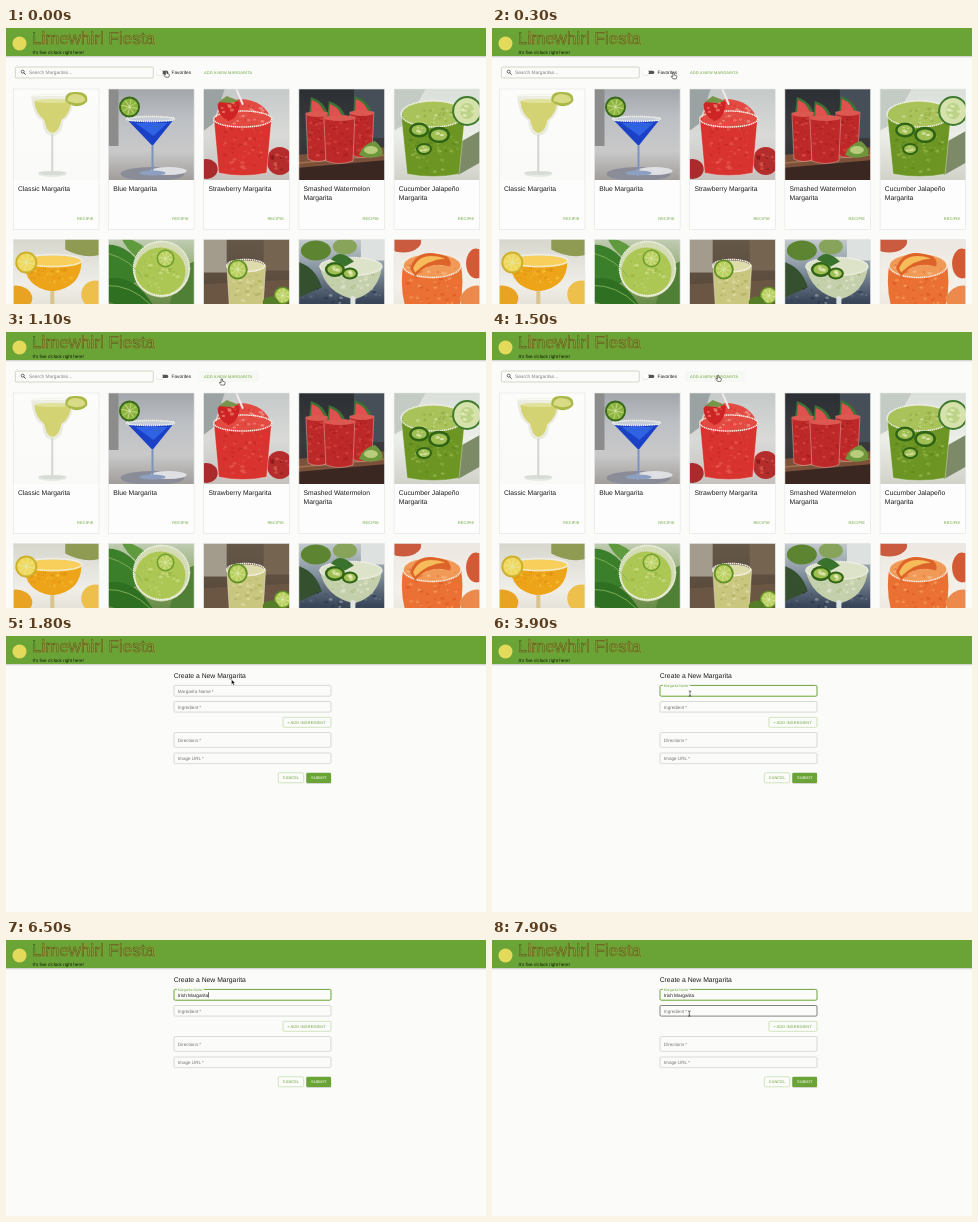
An HTML page that plays this animation: 480x276 px, repeating every 8 s.

```html
<!DOCTYPE html>
<html lang="en">
<head>
<meta charset="utf-8">
<title>Cocktail recipes</title>
<style>
html, body { margin: 0; width: 100%; height: 100%; overflow: hidden; background: #fbfbfa; }
svg { display: block; width: 100vw; height: 100vh; }
text { font-family: "Liberation Sans", Arial, sans-serif; text-rendering: geometricPrecision; white-space: pre; }
</style>
</head>
<body>
<svg id="stage" viewBox="0 0 480 276" xmlns="http://www.w3.org/2000/svg"></svg>
<script>
const GREEN = '#6ba436', PAGE = '#fbfbfa', INK = '#1d1d1d', GREY = '#777', LINE = '#c2c4c1';
const LOOP = 8000, STEP = 100;

// Markup helpers
const rect = (x, y, w, h, fill, more = '') =>
  `<rect x="${x}" y="${y}" width="${w}" height="${h}" fill="${fill}" ${more}/>`;
const oval = (x, y, rx, ry, fill, more = '') =>
  `<ellipse cx="${x}" cy="${y}" rx="${rx}" ry="${ry}" fill="${fill}" ${more}/>`;
const path = (d, fill, more = '') => `<path d="${d}" fill="${fill}" ${more}/>`;
const line = (d, color, width = 1, more = '') =>
  path(d, 'none', `stroke="${color}" stroke-width="${width}" stroke-linecap="round" ${more}`);
const text = (x, y, size, fill, words, more = '') =>
  `<text x="${x}" y="${y}" font-size="${size}" fill="${fill}" ${more}>${words}</text>`;
const caps = (x, y, words, fill = GREEN) => text(x, y, 3.94, fill, words, 'letter-spacing=".11"');
const box = (x, y, w, h, color, more = '') =>
  rect(x, y, w, h, 'none', `rx="1.3" stroke="${color}" stroke-width=".6" ${more}`);

let fades = 0;
const fade = (...colors) => {
  const id = 'fade' + fades++;
  const stops = colors.map((c, i) => `<stop offset="${i / (colors.length - 1)}" stop-color="${c}"/>`);
  return `<linearGradient id="${id}" x2="0" y2="1">${stops.join('')}</linearGradient>` +
    rect(-3, -3, 92, 97, `url(#${id})`);
};

// Seeded specks that give ice and fruit pulp their texture
let seed = 7;
const random = () => (seed = seed * 16807 % 2147483647) / 2147483647;
const grain = (count, x, y, rx, ry, ...colors) => {
  let out = '';
  for (let i = 0; i < count; i++) {
    const a = random() * 2 * Math.PI, r = Math.sqrt(random()), size = .6 + random() * 1.6;
    out += oval((x + Math.cos(a) * r * rx).toFixed(1), (y + Math.sin(a) * r * ry).toFixed(1),
      size.toFixed(1), (size * .7).toFixed(1), colors[i % colors.length], 'opacity=".55"');
  }
  return out;
};

const wheel = (x, y, r, rind = '#5f8f25', flesh = '#b9d05f') => {
  let spokes = '';
  for (let i = 0; i < 4; i++) {
    const a = i * Math.PI / 4 + .2, dx = Math.cos(a) * r * .75, dy = Math.sin(a) * r * .75;
    spokes += `M${x - dx} ${y - dy}L${x + dx} ${y + dy}`;
  }
  return oval(x, y, r, r, rind) + oval(x, y, r * .82, r * .82, flesh) + line(spokes, '#e4ecbc', .6);
};
const chili = (x, y, r) => oval(x, y, r, r * .75, '#2f6415') + oval(x, y, r * .75, r * .5, '#9fbf52') +
  grain(6, x, y, r * .45, r * .3, '#eef1c8');
const salt = (x, y, rx, ry) => oval(x, y, rx, ry, 'none',
  'stroke="#f4f2e8" stroke-width="1.5" stroke-dasharray="1.4 .5"');
const tumbler = (x, y, w, h, color, inset = 3) =>
  path(`M${x} ${y}h${w}l${-inset} ${h}q${inset - w / 2} 5 ${2 * inset - w} 0z`, color,
    'stroke="#fff" stroke-opacity=".4" stroke-width=".8"');

const photos = [
  () => fade('#fcfcfa', '#f9faf7') + oval(39, 85, 14, 3, '#e6e9e3') +
    path('M18 7H61Q60 25 50 32Q49 46 39 47Q30 46 29 32Q19 26 18 7', '#eaebdf') +
    path('M21 12H58Q57 25 48 31Q46 43 39 44Q33 43 31 31Q22 24 21 12', '#d3d374') +
    oval(40, 12, 18, 2, '#e2e19a') + line('M39 46V83', '#d2d6cf', 2) +
    oval(39, 84, 14, 2, '#d8dcd6') + salt(40, 7, 21, 1.6) +
    path('M52 12Q51 3 61 3Q75 2 74 12Q70 18 61 17Q56 16 52 12', '#a9b847') +
    path('M54 12Q54 6 61 5Q71 5 72 11Q68 15 61 14z', '#d9db86'),
  () => fade('#a0a4a8', '#bcbfc3', '#c9c9ca', '#9d9995') + rect(-3, -3, 13, 60, '#8d8c8c') +
    oval(44, 85, 32, 7, '#8a8d98') + oval(60, 82, 18, 4, '#dfe0e4') +
    path('M17 28H66L44 58z', '#c9d3e2', 'opacity=".7"') + path('M20 32H64L44 57z', '#1a41c6') +
    path('M27 34H59L45 47z', '#2f63e4') + line('M44 57V82', '#7d93bb', 2) + oval(44, 84, 13, 2.5, '#8da0c2') +
    salt(42, 30, 24, 2.5) + wheel(21, 18, 10.5, '#36691a', '#8db43c'),
  () => fade('#c3c8c8', '#d9dad8', '#c4c0bc') + path('M-3 -3H22L9 35L-3 44z', '#9aa3a2') +
    oval(3, 80, 11, 10, '#a92b2b') + oval(76, 72, 13, 14, '#b42d2c') + grain(14, 76, 72, 9, 10, '#e3645a', '#7e1818') +
    tumbler(10, 28, 58, 56, '#d8332f', 5) + grain(70, 38, 56, 23, 26, '#ee635a', '#c02523', '#e24a42') +
    path('M12 32Q14 15 36 10Q62 11 68 32Q40 44 12 32', '#e34a42') +
    grain(34, 42, 26, 22, 11, '#f48d81', '#f3aea3', '#d53631') + salt(39, 30, 29, 8) +
    line('M39 15L33 1', '#f0e9e7', 2) + path('M14 15Q22 4 36 13Q36 28 25 32Q13 26 14 15', '#cf2426') +
    grain(10, 25, 19, 7, 8, '#f3a384') + path('M15 13L23 7L35 12L27 14z', '#78964b'),
  () => fade('#2a2e33', '#3b3b3d', '#33292a') + rect(55, -3, 34, 52, '#464e58') +
    path('M-3 66L89 58V94H-3z', '#7b5239') + path('M-3 79L89 71V94H-3z', '#3a2722') +
    line('M0 74L86 66', '#a2704c', 1.5) +
    [[7, 24, 24, 46], [51, 23, 24, 43], [25, 28, 31, 44]].map(([x, y, w, h]) =>
      path(`M${x + 3} ${y + 3}L${x + 5} ${y - 16}Q${x + 20} ${y - 11} ${x + 22} ${y + 3}z`, '#3f7236') +
      path(`M${x + 5} ${y + 3}L${x + 6} ${y - 13}Q${x + 17} ${y - 9} ${x + 19} ${y + 3}z`, '#e0504e') +
      tumbler(x, y, w, h, '#bd2928', 2) + grain(35, x + w / 2, y + h / 2, w * .4, h * .45, '#dd4c46', '#a31e20') +
      oval(x + w / 2, y + 1, w / 2, 3, '#dc5850')).join('') +
    path('M60 66Q65 54 76 52Q87 61 82 67Q70 71 60 66', '#6f963c') + oval(72, 61, 7, 4, '#b8cd7c'),
  () => fade('#d9ded9', '#eceee8', '#cfd1c8') + path('M-3 -3H33L12 35L-3 43z', '#c3cbc4') +
    path('M68 52L89 40V72L64 86z', '#7d8a68') + tumbler(7, 25, 64, 60, '#6c9524', 6) +
    grain(70, 39, 58, 25, 25, '#86ad38', '#557d19', '#a3c052') + oval(39, 25, 31, 13, '#a9c35a') +
    grain(30, 39, 28, 24, 9, '#d3dfa0', '#7fa337') + salt(39, 25, 32, 13) +
    chili(25, 41, 10) + chili(45, 46, 11) + chili(30, 60, 8) +
    oval(73, 22, 15, 15, '#3f7a2f') + oval(73, 22, 13, 13, '#d5e2ac') + oval(73, 22, 7, 8, '#bcd388') +
    grain(9, 73, 22, 6, 6, '#eef2cd'),
  () => fade('#d6d5cc', '#efeee8', '#d8d1c2') + path('M52 -3H89V15Q70 20 52 10z', '#8f9a52') +
    oval(2, 59, 17, 13, '#e7a321') + oval(82, 55, 14, 14, '#ecc04a') +
    path('M11 22H68Q68 48 39 52Q11 48 11 22', '#eda419') + grain(40, 39, 35, 22, 10, '#f6bf38', '#dc8d0f') +
    oval(39.5, 22, 29, 6, '#f7cf5a') + salt(39.5, 21, 29, 6) + line('M39 53V94', '#d9c48d', 4) +
    wheel(13, 23, 11, '#cdb02b', '#f0d85c'),
  () => fade('#c4cfb7', '#7f9d5d', '#466f2b') + path('M-3 5Q25 4 39 40Q16 43 -3 64z', '#3b7f2a') +
    path('M12 -3Q40 3 47 24Q24 22 12 -3', '#5f9a3f') + path('M70 30L89 20V70H60z', '#4f8035') +
    oval(53, 30, 28, 28, '#d3dcb4') + oval(52, 32, 25, 24, '#adc755') +
    grain(45, 52, 32, 21, 20, '#d5e198', '#8dae39', '#c4d676') + salt(53, 29, 28, 27) +
    wheel(57, 19, 9, '#6f9d2d') + path('M-3 40Q25 32 46 68Q20 71 -3 61', '#2f6f22') +
    line('M-2 46Q22 45 42 65M0 14Q22 20 34 38', '#84b357', .9),
  () => fade('#66594a', '#5a4b3d', '#453a30') + rect(-3, -3, 26, 36, '#a39b8b') + rect(60, -3, 29, 34, '#75644f') +
    path('M-3 45L89 40V94H-3z', '#6b5644') + tumbler(23, 26, 39, 48, '#c9c67f', 3) +
    grain(35, 42, 47, 16, 16, '#e4e1ad', '#aaa95b') + oval(42, 27, 19, 6, '#dedcaa') +
    salt(42, 26, 19, 6) + wheel(34, 30, 10) + wheel(79, 56, 9) + oval(67, 63, 8, 6, '#557c27'),
  () => fade('#c7cfd0', '#8795a1', '#39465a', '#334054') + oval(17, 11, 15, 10, '#5d8431') +
    oval(46, 7, 12, 8, '#88a45a') + rect(62, -3, 27, 24, '#dde1df') + path('M-3 22Q16 26 23 48L-3 59z', '#34502f') +
    grain(35, 43, 57, 42, 11, '#65758a', '#232d40', '#a8b3ba') +
    path('M21 27H83Q80 53 55 60Q26 53 21 27', '#c4cfac') +
    grain(45, 52, 38, 24, 13, '#eef1e0', '#a5b67b', '#dce3c5') + oval(52, 27, 31, 9, '#dce3c9') +
    salt(52, 27, 31, 9) + line('M54 59V94', '#dfe5e3', 5) + chili(36, 30, 10) + chili(51, 34, 8) +
    path('M32 20Q41 8 55 22L46 27z', '#39722c'),
  () => fade('#ece7e0', '#f3f0ea', '#e5dbd0') + oval(9, 2, 18, 11, '#cb5b3e') + oval(82, 24, 10, 15, '#d45a35') +
    path('M9 26Q4 58 19 88H58Q72 58 67 26z', '#ea7034') +
    grain(60, 38, 50, 25, 24, '#f79a55', '#d9521f', '#f4b06c') + oval(38, 26, 29, 12, '#f19a58') +
    grain(25, 38, 28, 24, 8, '#f9c795', '#e2682f') + salt(38, 26, 29, 12) +
    path('M16 29Q23 6 53 17Q58 22 56 27Q33 21 21 37z', '#dd6328') +
    path('M19 29Q26 11 51 19Q34 20 21 33z', '#f6bc59') + path('M65 58Q77 41 89 48V70H69z', '#eb8a4c')
];

const titles = [['Classic Margarita'], ['Blue Margarita'], ['Strawberry Margarita'],
  ['Smashed Watermelon', 'Margarita'], ['Cucumber Jalapeño', 'Margarita']];

const card = (draw, i) => {
  const x = 7.3 + i % 5 * 95.2, y = i < 5 ? 61 : 211.5;
  const words = (titles[i] || []).map((t, n) => text(4.7, 102.4 + n * 9, 6.75, INK, t)).join('');
  return `<g transform="translate(${x} ${y})">` + rect(0, 0, 85.6, 140.5, '#fdfdfd') +
    `<g clip-path="url(#photo)"><g filter="url(#soft)">${draw()}</g></g>${words}` + caps(63.7, 131, 'RECIPIE') +
    rect(0, 0, 85.6, 140.5, 'none', 'stroke="#e3e5e1" stroke-width=".6"') + '</g>';
};

const title = (dx, color, width) => text(26 + dx, 16.3, 17, 'none', 'Limewhirl Fiesta',
  `stroke="${color}" stroke-width="${width}"`);
const header = rect(0, 28, 480, 2, '#000', 'opacity=".05"') + rect(0, 28, 480, 1, '#000', 'opacity=".1"') +
  rect(0, 0, 480, 28, GREEN) + oval(13.5, 15.5, 7, 7, '#e3d95b') +
  title(.3, '#b59a35', .5) + title(0, '#3d4216', .4) +
  text(26.5, 26.2, 4.6, '#10160a', 'It\'s five o\'clock right here!');

const list = box(9.3, 39, 138, 11, '#b4c2a2') + oval(16.7, 43.7, 1.5, 1.5, 'none', 'stroke="#333" stroke-width=".7"') +
  line('M17.9 44.9L19.4 46.4', '#333', .8) + text(23, 46.2, 4.8, '#858585', 'Search Margaritas...') +
  rect(152.5, 42.8, 9.8, 3.3, '#555', 'rx="1.6"') +
  oval(153.7, 44.8, 3.2, 3.2, '#000', 'opacity=".18"') + oval(153.7, 44.4, 3.1, 3.1, '#fff') +
  text(165.5, 46.2, 4.75, INK, 'Favorites') +
  rect(193, 39, 60, 11, GREEN, 'id="tint" rx="1.2" opacity="0"') + caps(198, 45.8, 'ADD A NEW MARGARITA') +
  photos.map(card).join('');

const field = (y, h, label, id) => box(168, y, 157, h, LINE, `id="${id}"`) +
  text(171.8, y + h / 2 + 1.7, 4.6, GREY, label + '<tspan dx=".9">*</tspan>', `id="${id}Label"`);
const button = (x, y, w, words, textX) => box(x, y, w, 10, '#b4d096') + caps(textX, y + 6.4, words);
const form = text(167.7, 42.4, 6.8, INK, 'Create a New Margarita') +
  field(49.4, 10.8, 'Margarita Name', 'name') + rect(170.8, 48.6, 27.5, 1.8, PAGE, 'id="notch"') +
  text(171.8, 50.5, 3.45, GREEN, 'Margarita Name<tspan dx=".7">*</tspan>', 'id="small"') +
  text(171.8, 56.6, 4.75, INK, '', 'id="typed"') + rect(0, 52.2, .6, 5.4, INK, 'id="caret"') +
  field(65.5, 10.6, 'Ingredient', 'ingredient') + button(277, 81.3, 48, '+ ADD INGREDIENT', 281.2) +
  field(96.5, 14.8, 'Directions', 'directions') + field(117, 10.7, 'Image URL', 'image') +
  button(272.3, 136.8, 25.4, 'CANCEL', 276.7) +
  rect(300.3, 137.4, 24.8, 10.3, '#000', 'rx="1.3" opacity=".2"') +
  rect(300.3, 136.7, 24.8, 10.3, GREEN, 'rx="1.3"') + caps(304.9, 143.2, 'SUBMIT', '#fff');

const pointers = {
  hand: path('M-.6 .2Q.2 -.6 .8 .3V2.4L3 3Q3.6 3.4 3.3 4.5L2.7 6.2H-.5L-2.3 3.9Q-2.2 3 -1.3 3.4L-.6 4z',
    '#fff', 'stroke="#222" stroke-width=".6"'),
  arrow: path('M0 0V5L1.2 3.9L2 5.7L2.9 5.3L2.1 3.6H3.7z', '#111', 'stroke="#fff" stroke-width=".35"'),
  beam: line('M-.9 -2.7Q0 -2.7 0 -2V2Q0 2.7 -.9 2.7M.9 -2.7Q0 -2.7 0 -2M.9 2.7Q0 2.7 0 2', '#222', .6)
};

const stage = document.getElementById('stage');
stage.innerHTML = '<clipPath id="photo"><rect width="85.6" height="91"/></clipPath>' +
  '<filter id="soft"><feGaussianBlur stdDeviation=".45"/></filter>' +
  rect(0, 0, 480, 276, PAGE) + `<g id="list">${list}</g><g id="form">${form}</g>` + header + '<g id="pointer">' +
  Object.entries(pointers).map(([k, d]) => `<g id="${k}">${d}</g>`).join('') + '</g>';

const $ = id => document.getElementById(id);
const show = (id, on) => $(id).setAttribute('visibility', on ? 'inherit' : 'hidden');
const set = (id, values) => Object.entries(values).forEach(([k, v]) => $(id).setAttribute(k, v));

// time, x, y of the pointer
const route = [[0, 160, 43], [700, 214.5, 47.3], [1000, 214.5, 47.3], [1500, 226, 43.2], [1700, 226, 43.2],
  [1800, 225.5, 43.5], [2300, 224, 45], [3500, 198, 57.6], [7400, 198, 57.6], [7900, 197.3, 73.6]];
const pointerAt = t => {
  const n = route.findIndex(p => p[0] > t);
  if (n < 0) return route[route.length - 1].slice(1);
  const [a, b] = [route[n - 1], route[n]];
  const u = (t - a[0]) / (b[0] - a[0]), k = u * u * (3 - 2 * u);
  return [a[1] + (b[1] - a[1]) * k, a[2] + (b[2] - a[2]) * k];
};

const PHRASE = 'Irish Margarita';
const typedCount = t => {
  if (t < 5000) return 0;
  if (t < 5800) return Math.min(6, (t - 4900) / 100);
  return Math.min(15, 6 + Math.floor((t - 5700) / 100 * 9 / 8));
};

function render(t) {
  const onForm = t >= 1800, focused = t >= 3900, typing = t >= 5000 && t < 6900;
  const [x, y] = pointerAt(t);
  const inside = (top, bottom) => onForm && x > 168 && x < 325 && y > top && y < bottom;
  const overName = inside(49.4, 60.2), overIngredient = inside(65.5, 76.1);
  show('list', !onForm);
  show('form', onForm);

  const kind = !onForm ? 'hand' : overName || overIngredient ? 'beam' : 'arrow';
  for (const k in pointers) show(k, k === kind && !typing);
  set('pointer', { transform: `translate(${x} ${y})` });
  set('tint', { opacity: x > 193 && t < 1800 ? .03 : 0 });

  set('name', { stroke: focused ? GREEN : overName ? '#333' : LINE, 'stroke-width': focused ? 1 : .6 });
  set('ingredient', { stroke: overIngredient ? '#333' : LINE });
  show('nameLabel', onForm && !focused);
  show('notch', onForm && focused);
  show('small', onForm && focused);

  $('typed').textContent = PHRASE.slice(0, typedCount(t));
  const blink = typing || (t - 4000) % 1000 < 500;
  show('caret', focused && t >= 4000 && blink && t < 7500);
  set('caret', { x: 172 + $('typed').getComputedTextLength() });
}

const start = performance.now();
function tick() {
  const t = (performance.now() - start) % LOOP;
  render(Math.floor(t / STEP) * STEP);
  requestAnimationFrame(tick);
}
tick();
</script>
</body>
</html>
```
